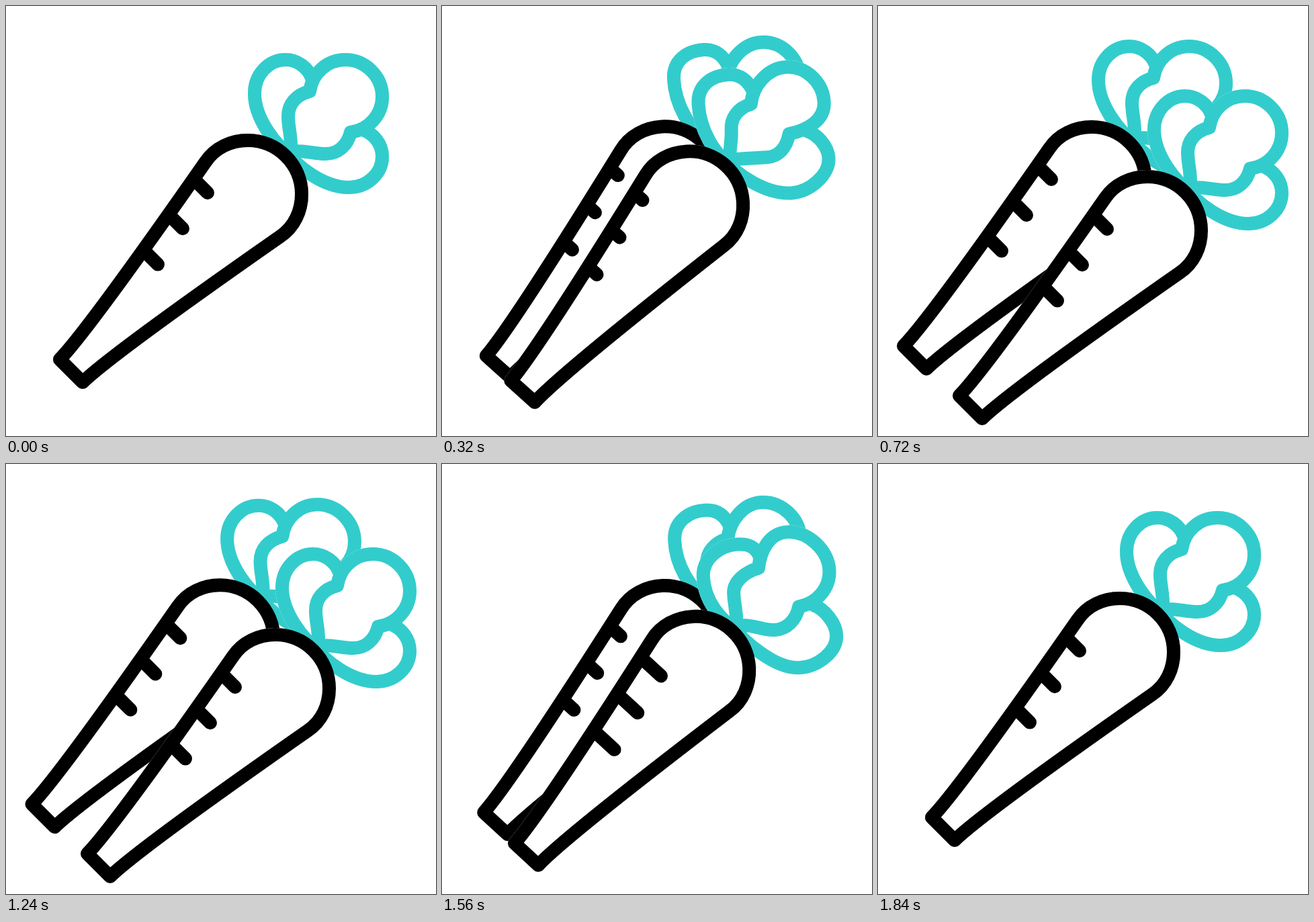
An HTML page with a canvas for the animation above (2 s loop, 640x640 px).

```html
<!DOCTYPE html>
<html lang="en">
<head>
<meta charset="utf-8">
<title>Carrots</title>
<style>
html, body { margin: 0; width: 100%; height: 100%; overflow: hidden; background: #fff; }
canvas { display: block; width: 100vmin; height: 100vmin; }
</style>
</head>
<body>
<canvas id="stage" width="640" height="640"></canvas>
<script>
const ctx = document.getElementById('stage').getContext('2d');
const LOOP = 2000, STEP = 40, START = 80;
const TEAL = '#33cccc', BLACK = '#000', WHITE = '#fff';

// Nodes: x, y, incoming handle, outgoing handle. The drawing is symmetric about x + y = 640.
const mirror = ([x, y, ix, iy, ox, oy]) => [640 - y, 640 - x, -oy, -ox, -iy, -ix];
const mirrored = nodes => nodes.map(mirror).reverse();

const sideLeaf = [
  [428, 226, 0, 0, -28, -18],
  [370, 130, 0, 36, 0, -28],
  [416, 80, -25, 0, 18, 0],
  [455, 107, -6, -15, 0, 0]
];
const heart = [424, 216, 26, -1, 1, -26];
const midHalf = [
  [420, 164, 0, 19, 0, -18],
  [452, 127, -20, 5, 4, -27],
  [505, 80, -27, 0, 30, 0]
];
const bodyHalf = [
  [80, 526, 0, 0, 35, -36],
  [297, 232, -95, 136, 14, -21],
  [360, 200, -25, 0, 44, 0]
];

// Each leaf bends towards two poses: shift a, then shift b, per node.
const leaves = [
  {
    nodes: sideLeaf,
    a: [[0, 0], [12, 0], [13, 9], [9, 9]],
    b: [[0, 0], [7, 12], [15, 16], [8, 9]]
  },
  {
    nodes: mirrored(sideLeaf),
    a: [[8, -6], [11, -3], [2, 0], [0, 0]],
    b: [[7, 7], [12, 14], [4, 14], [0, 0]]
  },
  {
    nodes: [heart, ...midHalf, ...mirrored(midHalf)],
    closed: true,
    a: [[0, 0], [9, 8], [8, 8], [10, 3], [9, 3], [1, -6], [3, -5]],
    b: [[0, 0], [1, 4], [8, 5], [0, 0], [5, 5], [5, 5], [4, 6]]
  }
];

function trace(nodes, closed) {
  const path = new Path2D();
  path.moveTo(nodes[0][0], nodes[0][1]);
  const list = closed ? [...nodes, nodes[0]] : nodes;
  for (let i = 1; i < list.length; i++) {
    const p = list[i - 1], q = list[i];
    path.bezierCurveTo(p[0] + p[4], p[1] + p[5], q[0] + q[2], q[1] + q[3], q[0], q[1]);
  }
  if (closed) path.closePath();
  return path;
}

const body = trace([...bodyHalf, ...mirrored(bodyHalf)], true);

const smooth = x => {
  x = Math.min(1, Math.max(0, x));
  return x * x * (3 - 2 * x);
};
const ramp = (t, from, to) => smooth((t - from) / (to - from));
const bump = (u, peak) => smooth(1 - Math.abs(u - peak));

function bend({ nodes, a, b, closed }, wa, wb) {
  const moved = nodes.map(([x, y, ...handles], i) => [
    x + a[i][0] * wa + b[i][0] * wb,
    y + a[i][1] * wa + b[i][1] * wb,
    ...handles
  ]);
  return trace(moved, closed);
}

function paint(path, color) {
  ctx.fillStyle = WHITE;
  ctx.strokeStyle = color;
  ctx.fill(path);
  ctx.stroke(path);
}

function drawCarrot(shapes, marks, leafColor, bodyColor) {
  shapes.forEach(s => paint(s, leafColor));
  paint(body, bodyColor);
  ctx.stroke(marks);
}

function carrot(dx, dy, move, tilt, t, end, cutout) {
  const u = 3 * (t - START) / (end - START);
  const wa = bump(u, 1), wb = bump(u, 2);
  const shapes = leaves.map(l => bend(l, wa, wb));

  const marks = new Path2D();
  const grow = 10 * (wb - wa);
  for (let i = 0; i < 3; i++) {
    const x = 300 - 37 * i, y = 278 + 53.3 * i;
    marks.moveTo(x - 20, y - 20);
    marks.lineTo(x + grow, y + grow);
  }

  ctx.save();
  ctx.translate(97 + dx * move, 543 + dy * move);
  ctx.rotate(-tilt);
  ctx.translate(-97, -543);
  if (cutout) drawCarrot(shapes, marks, WHITE, WHITE);
  drawCarrot(shapes, marks, TEAL, BLACK);
  ctx.restore();
}

function draw(time) {
  const back = time >= LOOP * 0.48;
  const t = back ? 1920 - time : time;
  const tilt = 4 * Math.PI / 180 * (t < 240 ? ramp(t, START, 240) : 1 - ramp(t, 240, 520));

  ctx.fillStyle = WHITE;
  ctx.fillRect(0, 0, 640, 640);
  ctx.lineWidth = 20;
  ctx.lineCap = ctx.lineJoin = 'round';
  carrot(-42, -20, ramp(t, START, 720), tilt, t, 720, false);
  carrot(41, 54, ramp(t, START, 520), tilt, t, back ? 540 : 720, true);
}

const origin = performance.now();
function tick() {
  const time = (performance.now() - origin) % LOOP;
  draw(Math.floor(time / STEP) * STEP);
  requestAnimationFrame(tick);
}
tick();
</script>
</body>
</html>
```
